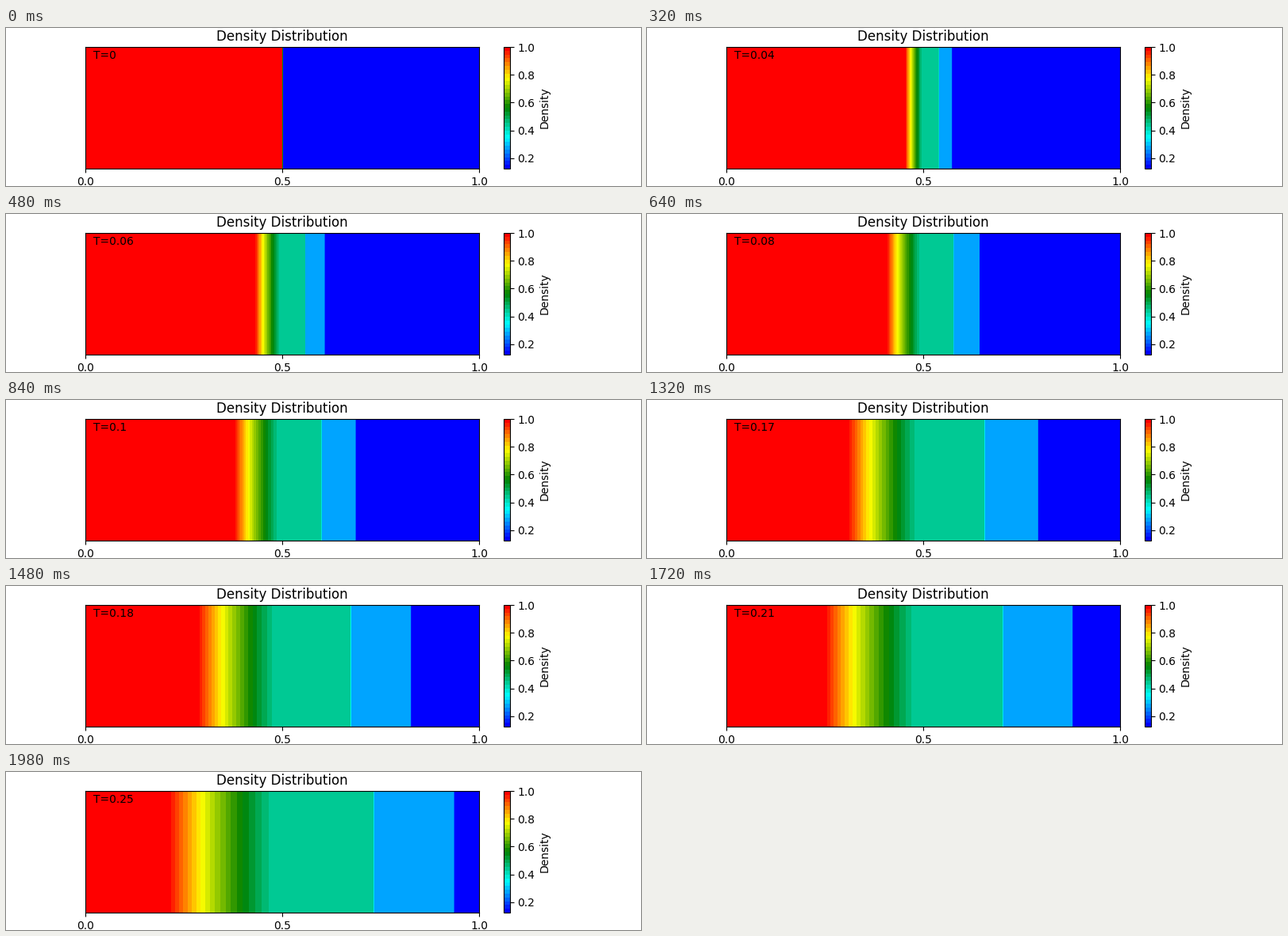
Write a matplotlib script that moves like this. It is 800 px wide and 200 px high and loops after 2000 ms.

```python
import numpy as np
import matplotlib.pyplot as plt
from matplotlib.animation import FuncAnimation
from matplotlib.colors import LinearSegmentedColormap

# Sod shock tube, gamma = 1.4
GAMMA = 1.4
RHO_L, RHO_R = 1.0, 0.125
RHO_FAN, RHO_SHOCK = 0.42632, 0.26557
U_CONTACT, U_SHOCK = 0.92745, 1.75216
SOUND_L = np.sqrt(GAMMA)

FRAMES, DT = 100, 0.0025
COLS, SUB = 496, 20

# Sub-samples per column, offset so the diaphragm falls inside a cell
x = (np.arange(COLS * SUB) + 0.5) / (COLS * SUB) - 0.5 - 0.5 / COLS


def density(t):
    s = x / max(t, 1e-9)
    fan = 2 / (GAMMA + 1) - (GAMMA - 1) / (GAMMA + 1) * s / SOUND_L
    rho = np.clip(fan, 0, 1) ** (2 / (GAMMA - 1))
    rho = np.clip(rho, RHO_FAN, RHO_L)
    rho[s > U_CONTACT] = RHO_SHOCK
    rho[s > U_SHOCK] = RHO_R
    return rho.reshape(COLS, SUB).mean(axis=1)[None, :]


cmap = LinearSegmentedColormap.from_list(
    "density", ["blue", "cyan", "green", "yellow", "red"], N=32)

fig, ax = plt.subplots(figsize=(8, 2), dpi=100)
image = ax.imshow(density(0), cmap=cmap, vmin=RHO_R, vmax=RHO_L,
                  extent=(0, 1, 0, 1), aspect="auto", interpolation="nearest")
ax.set_title("Density Distribution")
ax.set_xticks([0, 0.5, 1])
ax.set_yticks([])
fig.colorbar(image, ax=ax, label="Density")
label = ax.text(0.02, 0.9, "T=0")


def update(i):
    t = i * DT
    image.set_data(density(t))
    label.set_text(f"T={t:.2g}")
    return image, label


anim = FuncAnimation(fig, update, frames=FRAMES, interval=20,
                     repeat=True, repeat_delay=0)
plt.show()
```
